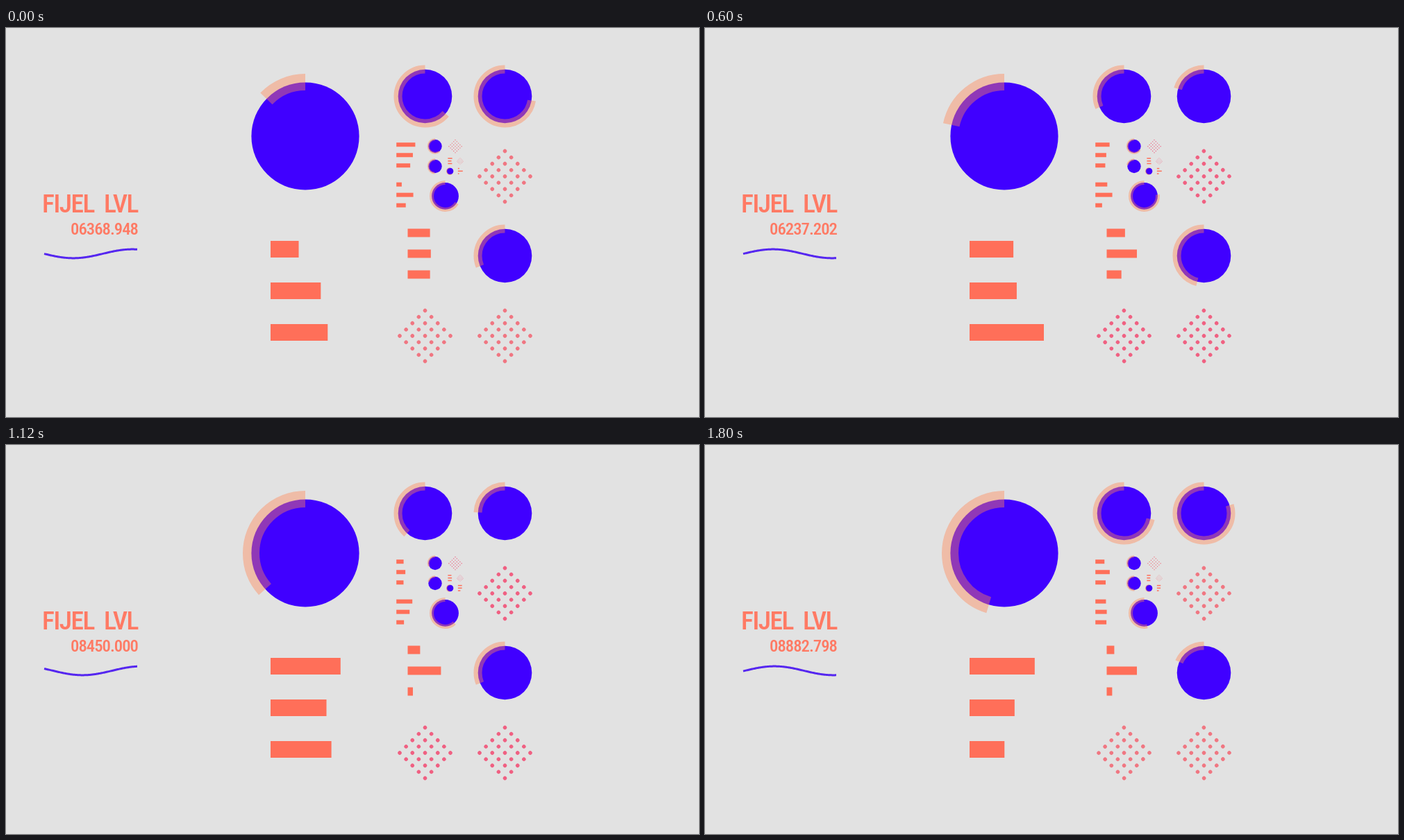
An HTML page with a canvas that plays this animation: 998 by 561 pixels, repeating every 1.84 s.

```html
<!DOCTYPE html>
<html lang="en">
<head>
<meta charset="utf-8">
<title>Power gauge panel</title>
<style>
html, body { margin: 0; width: 100%; height: 100%; overflow: hidden; background: #e2e2e2; }
canvas { display: block; }
</style>
</head>
<body>
<canvas id="stage" width="998" height="561"></canvas>
<script>
const ctx = document.getElementById('stage').getContext('2d');
const LOOP = 1840, STEP = 40, TAU = Math.PI * 2;
const BG = '#e2e2e2', CORAL = '#ff6f59', BLUE = '#4000ff', RING = 'rgba(255,135,85,.42)';

// Value swinging around mid, highest at time peak.
const wave = (mid, amp, peak, period = 2650) =>
  t => mid + amp * Math.cos((t - peak) / period * TAU);

// Angle in degrees, counter-clockwise from the top.
const sweep = (mid, amp, peak, period = 2200) => wave(mid, amp, peak, period);

function disc(x, y, r) {
  ctx.beginPath();
  ctx.arc(x, y, r, 0, TAU);
  ctx.fill();
}

// Draws a part around its own centre, in units of the largest cell.
const place = (x, y, scale, draw) => t => {
  ctx.save();
  ctx.translate(x, y);
  ctx.scale(scale, scale);
  draw(t);
  ctx.restore();
};

const gauge = (x, y, scale, angle) => place(x, y, scale, t => {
  const top = -TAU / 4;
  ctx.fillStyle = BLUE;
  disc(0, 0, 77.6);
  ctx.beginPath();
  ctx.arc(0, 0, 78, top, top - angle(t) * TAU / 360, true);
  ctx.lineWidth = 24;
  ctx.strokeStyle = RING;
  ctx.stroke();
});

const bars = (x, y, scale, ...widths) => place(x, y, scale, t => {
  ctx.fillStyle = CORAL;
  widths.forEach((width, i) => ctx.fillRect(-50, 60 * i - 79, width(t), 24));
});

// Quarter turn, eased in and out, repeating every 1200 ms.
function turn(t) {
  const u = Math.min(1, Math.max(0, (t % 1200 - 162) / 476));
  const eased = u < .5 ? 4 * u ** 3 : 1 - 4 * (1 - u) ** 3;
  return (.5 + eased) * TAU / 4;
}

const green = wave(107, 14, 1970, 2200);
const dots = (x, y, scale) => place(x, y, scale, t => {
  ctx.rotate(turn(t));
  ctx.fillStyle = `rgb(240,${Math.round(green(t))},130)`;
  for (let i = -2; i <= 2; i++)
    for (let j = -2; j <= 2; j++) disc(i * 25.8, j * 25.8, 5.5);
});

// Each level of the panel is half the size of the one before.
const parts = [
  gauge(431, 156, 1, sweep(105, 59, 1720, 3440)),
  bars(431, 386, 1, wave(74, 34, 1400), wave(72.5, 8, 1120, 1500), wave(78, 29, 600)),

  gauge(603.5, 98.5, 1 / 2, sweep(182, 78, 1880)),
  gauge(718.5, 98.5, 1 / 2, sweep(172, 124, 1930)),
  gauge(718.5, 328.5, 1 / 2, sweep(114, 52, 560)),
  bars(603.5, 329, 1 / 2, wave(43, 21.5, -100, 4000), wave(72, 24, 1200, 4200), wave(36.5, 28, -50, 3000)),
  dots(718.5, 214, 1 / 2),
  dots(603.5, 444, 1 / 2),
  dots(718.5, 444, 1 / 2),

  gauge(632.5, 242.4, 1 / 4, sweep(232, 46, 500)),
  bars(574.7, 185, 1 / 4, wave(72, 37, 50), wave(76, 25, -300), wave(61, 20, -150)),
  bars(574.7, 242.4, 1 / 4, wave(60, 32, 1150), wave(83, 19, 300), wave(52, 14, 2050)),

  gauge(618, 170.5, 1 / 8, sweep(170, 90, 350)),
  gauge(618, 199.5, 1 / 8, sweep(125, 65, 1970)),
  dots(647, 170.7, 1 / 8),

  gauge(639.5, 206.5, 1 / 16, sweep(190, 20, 0)),
  bars(639.5, 192.2, 1 / 16, wave(90, 10, 0), wave(85, 10, 800), wave(90, 10, 400)),
  bars(654, 206.8, 1 / 16, wave(65, 35, 1400), wave(98, 16, 300), wave(40, 16, 1200)),
  dots(654, 192.2, 1 / 16)
];

function setFont(size) {
  ctx.font = `500 ${size}px "Roboto Condensed", Roboto, sans-serif`;
  ctx.fontStretch = 'extra-condensed';
  ctx.letterSpacing = `${-.04 * size}px`;
}

// Right-aligned line centred on mid, smaller when it exceeds the column.
function drawText(str, mid, size, room) {
  setFont(size);
  const fit = size * Math.min(1, room / ctx.measureText(str).width);
  setFont(fit);
  ctx.fillStyle = '#ff7a64';
  ctx.textAlign = 'right';
  ctx.fillText(str, 190, mid + .357 * fit);
}

const reading = wave(7560, 1780, 1520, 2400);
const ripple = wave(325.5, 6.4, 97, 170);

function drawRipple(t) {
  ctx.beginPath();
  for (let x = 55; x <= 189; x++) ctx.lineTo(x, ripple(x + .14 * t));
  ctx.lineWidth = 3;
  ctx.strokeStyle = '#5526f0';
  ctx.stroke();
}

function frame(now) {
  const t = Math.floor(now % LOOP / STEP) * STEP;
  ctx.fillStyle = BG;
  ctx.fillRect(0, 0, 998, 561);
  parts.forEach(draw => draw(t));
  drawText('FIJEL\u00a0 LVL', 252.5, 38, 138);
  drawText(reading(t).toFixed(3).padStart(9, '0'), 289.5, 30, 97);
  drawRipple(t);
  requestAnimationFrame(frame);
}
requestAnimationFrame(frame);
</script>
</body>
</html>
```
